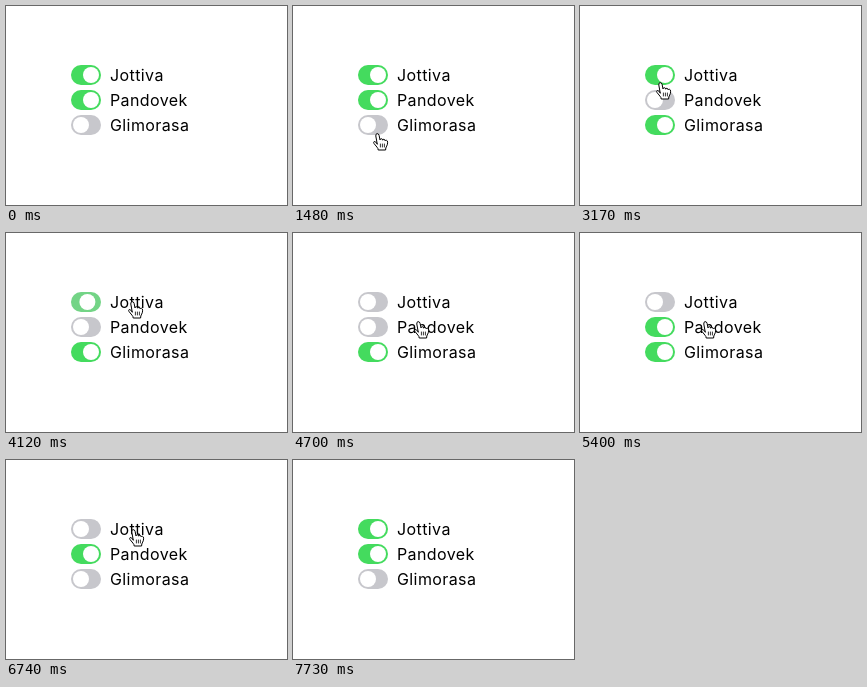
An HTML page that plays this animation: 281 by 199 pixels, repeating every 9.29 s.

```html
<!DOCTYPE html>
<html lang="en">
<head>
<meta charset="utf-8">
<title>Toggle switches</title>
<style>
  html, body { margin: 0; width: 100%; height: 100%; overflow: hidden; background: #fff; }
  svg { display: block; width: 281px; height: 199px; }
  text { font: 16px Inter, sans-serif; letter-spacing: .4px; }
  .knob { fill: #fff; }
  #hand { fill: #fff; stroke: #000; stroke-linejoin: round; stroke-linecap: round; }
  #arrow { stroke: #fff; stroke-width: 1.6; paint-order: stroke; }
</style>
</head>
<body>
<svg viewBox="0 0 281 199">
  <g id="rows"></g>
  <g id="cursor">
    <path id="arrow" d="M0 0V14.5L3.4 11.3 5.8 16.6 8 15.6 5.7 10.5H10.3Z"/>
    <g id="hand" transform="translate(-5)">
      <path d="M4.2 10.9 2.8 3Q2.6.8 4.1.6 5.6.5 6.1 2.4L7 6.9Q7.1 5.7 8.3 5.7 9.6 5.8 9.7 7.2 9.8 6.2 10.9 6.3 12.1 6.5 12.2 7.9 12.6 7.1 13.5 7.3 14.6 7.6 14.6 9.2 14.7 11.3 13.7 13.1 12.5 14.9 12.6 17H5.2Q5.2 15.4 4 14.2L1 10.5Q.2 9.2 1.2 8.5 2.4 8 4.2 10.9Z"/>
      <path d="M7.4 11v3M9.4 11v3M11.4 11v3" stroke-width=".8"/>
    </g>
  </g>
</svg>
<script>
const LOOP = 9290, STEP = 58, FLIP_TIME = 230;
const ENTER = 480, LEAVE = 7730;
const ROW_TOP = 59, ROW_GAP = 25, SWITCH_X = 84, LABEL_X = 127;
const ON = [68, 219, 94], OFF = [199, 199, 204];

const rows = [
  { label: 'Jottiva', on: 1 },
  { label: 'Pandovek', on: 1 },
  { label: 'Glimorasa', on: 0 },
];

// Places the cursor visits; a stop with a click flips its row
const entry = { x: 118, y: 135 };
const stops = [
  { arrive: 770, travel: 230, x: 110, y: 165 },
  { arrive: 1480, travel: 170, x: SWITCH_X + 1, y: 127, row: 2, click: 1890 },
  { arrive: 2360, travel: 180, x: SWITCH_X, y: 96, row: 1, click: 2770 },
  { arrive: 3170, x: SWITCH_X - 3, y: 76 },
  { arrive: 3640, travel: 410, x: LABEL_X, y: 68, row: 0, click: 4120 },
  { arrive: 4700, x: LABEL_X - 1, y: 88, row: 1, click: 5170 },
  { arrive: 5520, x: LABEL_X + 1, y: 112, row: 2, click: 5990 },
  { arrive: 6740, travel: 460, x: LABEL_X + 1, y: 69, row: 0, click: 7030 },
  { arrive: LEAVE, x: 137, y: 184 },
];

const $ = id => document.getElementById(id);
const mix = (a, b, p) => a + (b - a) * p;

// Eased progress in even steps; the first step shows at the start time
function progress(t, start, duration) {
  const steps = Math.round(duration / STEP) + 1;
  const done = Math.floor((t - start + 8) / STEP) + 1;
  const p = t < start ? 0 : Math.min(1, done / steps);
  return 1 - (1 - p) ** 2;
}

$('rows').innerHTML = rows.map(({ label }, i) => `
  <g transform="translate(65 ${ROW_TOP + ROW_GAP * i})">
    <rect class="track" width="30" height="20" rx="10"/>
    <circle class="knob" cy="10" r="8"/>
    <text x="39" y="16">${label}</text>
  </g>`).join('');
const tracks = document.querySelectorAll('.track');
const knobs = document.querySelectorAll('.knob');

function drawRow({ on }, i, t) {
  let level = on, goal = on;
  for (const { row, click } of stops) {
    if (row !== i) continue;
    goal = 1 - goal;
    level = mix(level, goal, progress(t, click, FLIP_TIME));
  }
  tracks[i].setAttribute('fill', `rgb(${OFF.map((c, k) => mix(c, ON[k], level))})`);
  knobs[i].setAttribute('cx', mix(10, 20, level));
}

function drawCursor(t) {
  let { x, y } = entry;
  for (const { arrive, travel = 115, ...stop } of stops) {
    const p = progress(t, arrive - travel, travel);
    x = mix(x, stop.x, p);
    y = mix(y, stop.y, p);
  }
  // A hand over the rows, an arrow in the gaps and below
  const overRow = y < 130 && (y - ROW_TOP) % ROW_GAP < 18.5;
  $('hand').style.display = overRow ? '' : 'none';
  $('arrow').style.display = overRow ? 'none' : '';
  $('cursor').style.display = t >= ENTER && t < LEAVE ? '' : 'none';
  $('cursor').setAttribute('transform', `translate(${Math.round(x)} ${Math.round(y)})`);
}

const begin = performance.now();
function tick() {
  const t = (performance.now() - begin) % LOOP;
  rows.forEach((row, i) => drawRow(row, i, t));
  drawCursor(t);
  requestAnimationFrame(tick);
}
tick();
</script>
</body>
</html>
```
